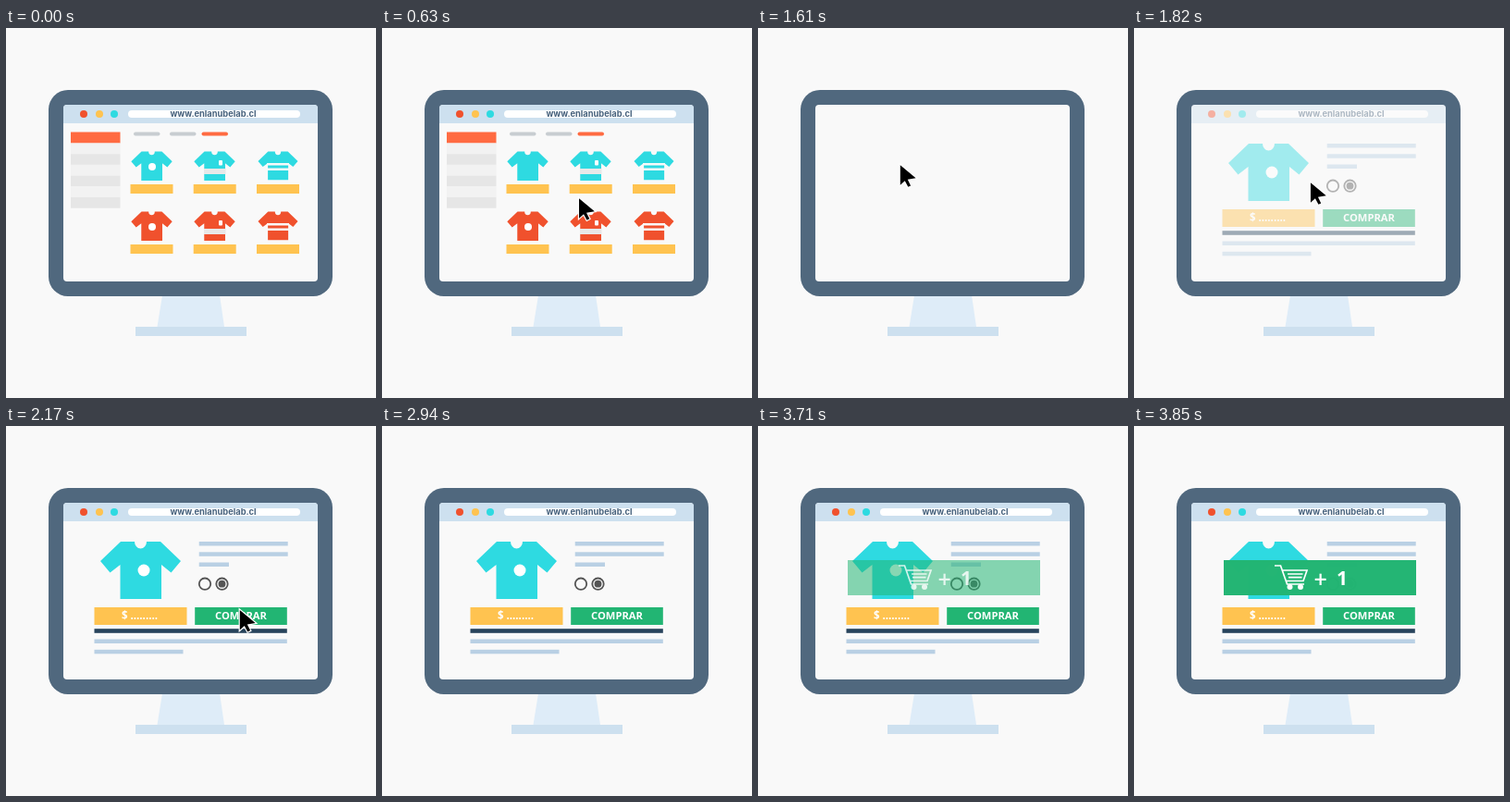
Write an HTML page that moves like this. It is 400x400 px and loops after 5.25 s.

```html
<!DOCTYPE html>
<html lang="es">
<head>
<meta charset="utf-8">
<title>Compra en línea</title>
<style>
  html, body { margin: 0; width: 100%; height: 100%; overflow: hidden; background: #f9f9f9; }
  svg { display: block; width: 100%; height: 100%; }
  text { font-family: "Open Sans", "Noto Sans", sans-serif; font-weight: 700; fill: #fff; }
  .url { font-family: Inter, "Liberation Sans", sans-serif; fill: #47627d; }
</style>
</head>
<body>
<svg viewBox="0 0 400 400">
  <defs>
    <path id="shirt" d="M-21.5 0H-6.5A6.5 7.5 0 0 0 6.5 0H21.5L43.5 21L33 33.5L22.5 25V62H-22V25L-33 33.5L-43.5 21Z"/>
    <clipPath id="screen"><rect x="62" y="83" width="275" height="191" rx="4"/></clipPath>
  </defs>
  <rect width="400" height="400" fill="#f9f9f9"/>
  <path d="M169 289H231L236 323H163.500Z" fill="#deecf8"/>
  <rect x="140" y="323" width="120" height="10" fill="#cde0ef"/>
  <rect x="46" y="67" width="307" height="223" rx="21" fill="#50687e"/>
  <rect x="62" y="83" width="275" height="191" rx="4" fill="#f9f9f9"/>
  <g clip-path="url(#screen)">
    <g id="bar"></g>
    <g id="shop"></g>
    <g id="item"></g>
    <g id="added"></g>
  </g>
  <path id="cursor" d="M0 0V21.500L5 17L8.500 23.500L11.300 22.100L8 15.500L16.800 14Z"
    stroke="#fff" stroke-width="2.400" paint-order="stroke"/>
</svg>
<script>
const LOOP = 5250, STEP = 70;
const CYAN = '#2edae1', RED = '#f0512d', YELLOW = '#ffc350', ORANGE = '#ff6b42',
      GREEN = '#22b573', BLUE = '#b9d0e4', PALE = '#f9f9f9';
const $ = id => document.getElementById(id);

const rect = (x, y, w, h, fill, rx = 0) =>
  `<rect x="${x}" y="${y}" width="${w}" height="${h}" rx="${rx}" fill="${fill}"/>`;
const dot = (x, y, r, fill) => `<circle cx="${x}" cy="${y}" r="${r}" fill="${fill}"/>`;
const text = (x, y, size, str, attrs = '') =>
  `<text x="${x}" y="${y}" font-size="${size}" text-anchor="middle" ${attrs}>${str}</text>`;
const shirt = (x, y, scale, fill) =>
  `<use href="#shirt" transform="translate(${x} ${y}) scale(${scale})" fill="${fill}"/>`;

function drawBar() {
  return rect(62, 83, 275, 20, '#cde0ef') +
    dot(84, 93, 4, RED) + dot(101, 93, 4, YELLOW) + dot(117, 93, 4, CYAN) +
    rect(132, 89, 186, 8, '#fff', 4) +
    text(224, 96, 9.3, 'www.enlanubelab.cl', 'class="url"');
}

function drawShop() {
  let out = rect(70, 112.5, 53.5, 12, ORANGE);
  for (let i = 0; i < 6; i++)
    out += rect(70, 124.5 + i * 11.7, 53.5, 11.7, i % 2 ? '#e6e6e6' : '#f2f2f2');
  [138, 177, 211.5].forEach((x, i) =>
    out += rect(x, 112.5, 28.5, 4, i < 2 ? '#c8cdd1' : ORANGE, 2));
  [[133.5, CYAN], [198.5, RED]].forEach(([y, color], row) => {
    [157.5, 225.5, 294].forEach((x, i) => {
      out += shirt(x, y, i < 2 ? 0.51 : 0.495, color);
      out += rect([134.5, 202.7, 271][i], y + 35.5, 46, 10, YELLOW);
    });
    out += `<g ${row ? '' : 'id="badge"'}>${dot(158, y + 16.5, 4, '#fff')}</g>` +
      rect(230, y + 9.5, 4, 5.5, '#fff', 1) +
      rect(214, y + 18.5, 23.5, 6, '#e8e8e8') +
      rect(282, y + 12.5, 24, 2.5, PALE) + rect(282, y + 18, 24, 2.5, PALE);
  });
  return out;
}

function drawItem() {
  const radio = x => `<circle cx="${x}" cy="170.700" r="6.200" fill="none" stroke="#555" stroke-width="1.800"/>`;
  return shirt(145.5, 125, 1, CYAN) + dot(149, 156, 6.5, '#fff') +
    rect(208.7, 125, 96, 4.5, BLUE) + rect(208.7, 136.3, 96, 4.5, BLUE) +
    rect(208.7, 147.5, 32.3, 4.5, BLUE) +
    radio(215) + radio(233.5) + dot(233.5, 170.7, 3.9, '#555') +
    rect(95.5, 196, 100, 19, YELLOW) + rect(204.2, 196, 99.6, 19, GREEN) +
    text(144.5, 209, 11.5, '$ .........') + text(254, 209, 11.2, 'COMPRAR') +
    rect(95.5, 219.2, 208.3, 4.6, '#27435b') +
    rect(95.5, 230.5, 208.3, 4.5, BLUE) + rect(95.5, 241.8, 96, 4.5, BLUE);
}

function drawAdded() {
  return `<g id="band">${rect(97, 145, 208, 38, GREEN)}</g><g id="cart">
    <path d="M152 151H158.500L165.500 171H184M161 156H187L183 167.500H164.500M166 160H182.500M167 163.700H181.500"
      fill="none" stroke="#fff" stroke-width="1.700"/>` +
    dot(168.5, 174, 3, '#fff') + dot(180, 174, 3, '#fff') +
    text(201.7, 174.5, 25, '+', 'style="font-weight:600"') + text(225, 172, 21, '1') + '</g>';
}

const PARTS = { bar: drawBar, shop: drawShop, item: drawItem, added: drawAdded };
for (const id in PARTS) $(id).innerHTML = PARTS[id]();

const progress = (t, from, to) => Math.min(1, Math.max(0, (t - from) / (to - from)));
const mix = (a, b, k) => a + (b - a) * k;
const fade = (id, value) => $(id).setAttribute('opacity', value);

// Shrinks and recovers within 420 ms of the press.
const press = (t, at) => 1 - 0.14 * Math.sin(Math.PI * progress(t, at, at + 350));

function moveCursor(t) {
  const enter = progress(t, 350, 840), cross = progress(t, 1610, 2170);
  const x = mix(mix(292, 153.8, enter), 252.8, cross);
  const y = mix(mix(232, 148.3, enter), 199, cross);
  const s = press(t, 1120) * press(t, 2240);
  $('cursor').setAttribute('transform',
    `translate(${x + 8.4 * (1 - s)} ${y + 12 * (1 - s)}) scale(${s})`);
  fade('cursor', t < 350 ? 0 : 1 - progress(t, 2730, 2940));
}

function render(time) {
  const t = Math.floor((time % LOOP) / STEP) * STEP;
  const page = progress(t, 1610, 2100);
  fade('shop', t < 1610 ? 1 : 0);
  fade('badge', t < 350 ? 1 : 0);
  fade('bar', t < 1610 ? 1 : page);
  fade('item', page);
  fade('band', 0.09 * progress(t, 3010, 3570) + 0.9 * progress(t, 3570, 3850));
  fade('cart', 0.6 * progress(t, 3010, 3570) + 0.4 * progress(t, 3570, 3850));
  moveCursor(t);
}

const start = performance.now();
function tick() {
  render(performance.now() - start);
  requestAnimationFrame(tick);
}
tick();
</script>
</body>
</html>
```
